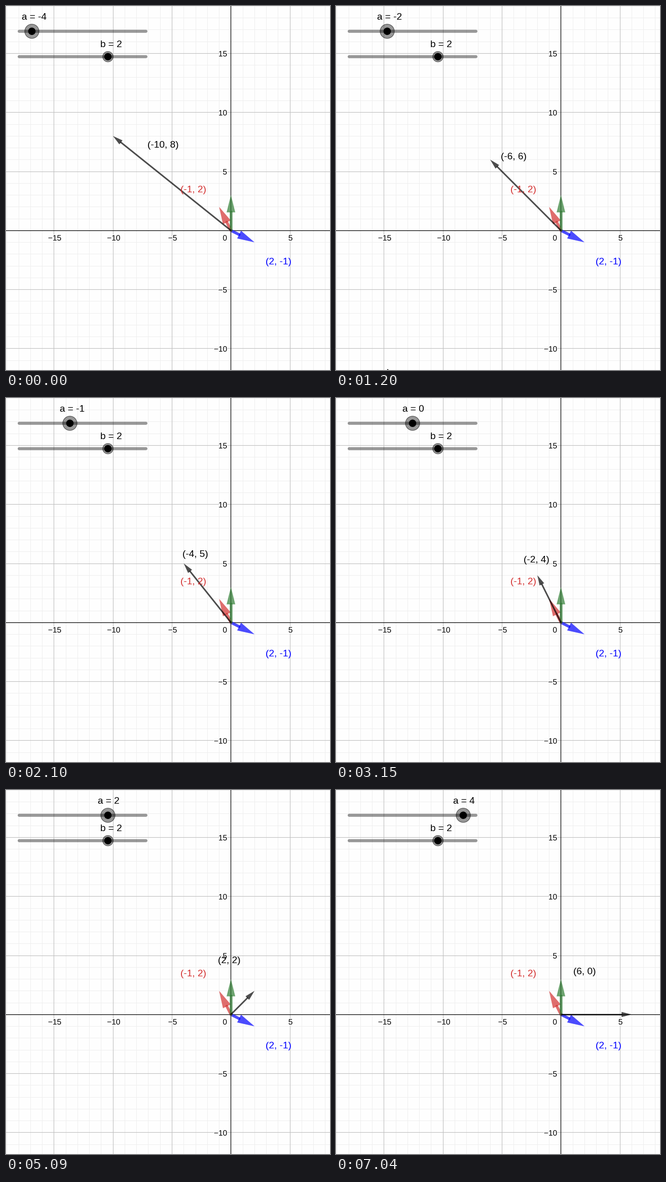
Recreate the animation shown at these times as a matplotlib script. Size 639 by 717 pixels, loop 8000 ms.

```python
import numpy as np
import matplotlib.pyplot as plt
from matplotlib.animation import FuncAnimation
from matplotlib.patches import Circle, Polygon
from matplotlib.patheffects import withStroke

W, H, DPI = 639, 717, 64
PX = 72 / DPI                        # points per pixel
STEP, LOOP = 20, 8000                # ms
ORIGIN, UNIT = np.array([443.6, 442.2]), 23.26
U, V = np.array([2, -1]), np.array([-1, 2])
B = 2
A_CHANGES = [150, 1200, 2100, 3150, 4050, 5090, 6140, 7040]
RED, GREEN, BLUE = "#d32f2f", "#2e7d32", "#0000ff"

plt.rcParams["font.family"] = "Liberation Sans"
fig = plt.figure(figsize=(W / DPI, H / DPI), dpi=DPI, facecolor="#fefefe")
ax = fig.add_axes([0, 0, 1, 1])
ax.set(xlim=(0, W), ylim=(H, 0))
ax.axis("off")


def to_px(p):
    return ORIGIN + UNIT * np.array([p[0], -p[1]])


def label(x, y, text, size=19, color="black", **kw):
    return ax.text(x, y, text, fontsize=size * PX, color=color,
                   va="baseline", zorder=9, **kw)


def grid(ticks, color, width, z):
    """Draw the horizontal and vertical lines at the given ticks."""
    xs = np.round(ORIGIN[0] + UNIT * ticks - .3) + .5
    ys = np.round(ORIGIN[1] - UNIT * ticks - .3) + .5
    style = dict(colors=color, linewidths=width * PX, zorder=z, snap=False)
    ax.vlines(xs, 0, H, **style)
    ax.hlines(ys, 0, W, **style)


def axis_labels():
    halo = dict(size=15.5, path_effects=[withStroke(linewidth=3 * PX, foreground="#fefefe")])
    for n in (-15, -10, -5, 5):
        text = str(n).replace("-", "\u2212")
        label(ORIGIN[0] + UNIT * n + 1.2, 462, text, ha="center", **halo)
    for n in (15, 10, 5, -5, -10):
        text = str(n).replace("-", "\u2212")
        label(436, ORIGIN[1] - UNIT * n + 6, text, ha="right", **halo)
    label(436, 462, "0", ha="right", **halo)


class Arrow:
    def __init__(self, color, width, head, z):
        self.head = head
        self.shaft, = ax.plot([], [], color=color, alpha=.7, lw=width * PX,
                              solid_capstyle="round", zorder=z)
        self.tip = Polygon(np.zeros((3, 2)), fc=color, alpha=.7, lw=0, zorder=z)
        ax.add_patch(self.tip)

    def point_to(self, vec):
        end = to_px(vec)
        d = (end - ORIGIN) / np.hypot(*(end - ORIGIN))
        side = np.array([-d[1], d[0]]) * self.head / 4
        base = end - d * self.head
        self.shaft.set_data(*zip(ORIGIN, base))
        self.tip.set_xy([end, base + side, base - side])


class Slider:
    def __init__(self, y, radius):
        ax.plot([26, 276], [y, y], color="black", alpha=.4, lw=6 * PX,
                solid_capstyle="round", zorder=5, snap=False)
        self.y = y
        self.ring = Circle((0, y), radius, fc=(0, 0, 0, .4), ec=(0, 0, 0, .55),
                           lw=1.2 * PX, zorder=6)
        self.dot = Circle((0, y), 7.3, fc="black", lw=0, zorder=7)
        ax.add_patch(self.ring)
        ax.add_patch(self.dot)

    def set(self, value):
        center = 151 + 25 * value, self.y
        self.ring.center = center
        self.dot.center = center


grid(np.arange(-20, 20), "#eeeeee", 1, 0)
grid(np.arange(-15, 20, 5), "#c0c0c0", 1.1, 1)
grid(np.array([0]), "black", 1.2, 2)
axis_labels()

for vec, color in ((U, BLUE), (V, RED), ((0, 3), GREEN)):
    Arrow(color, 5.5, 34, 3).point_to(vec)
label(343.8, 367, "(-1, 2)", color=RED)
label(512.4, 509, "(2, -1)", color=BLUE)

total = Arrow("black", 3, 20, 4)
total_label = label(0, 0, "")
a_slider, b_slider = Slider(49.8, 14), Slider(99.8, 10.2)
a_label = label(0, 27, "")
b_slider.set(B)
label(186, 81, f"b = {B}")

pointer = Polygon([(101, 714.5), (101, 718), (105.5, 718)], fc="black", lw=0, zorder=9)
ax.add_patch(pointer)


def update(i):
    end = (i + 1) * STEP
    a = -4 + sum(t < end for t in A_CHANGES)
    a_slider.set(a)
    a_label.set_text(f"a = {a}")
    a_label.set_x(131.2 + 25 * a)

    vec = a * U + B * V
    total.point_to(vec)
    d = vec / np.hypot(*vec)
    # the label sits at a fixed offset from the middle, pushed along the normal
    x, y = to_px(vec / 2) + (-45.4, -74.4) - 5 * d[::-1]
    total_label.set_text(f"({vec[0]}, {vec[1]})")
    total_label.set_position((x, y))

    pointer.set_visible(1200 < end <= 1350)


anim = FuncAnimation(fig, update, frames=LOOP // STEP, interval=STEP,
                     init_func=lambda: update(0), repeat=True, repeat_delay=0)
plt.show()
```
